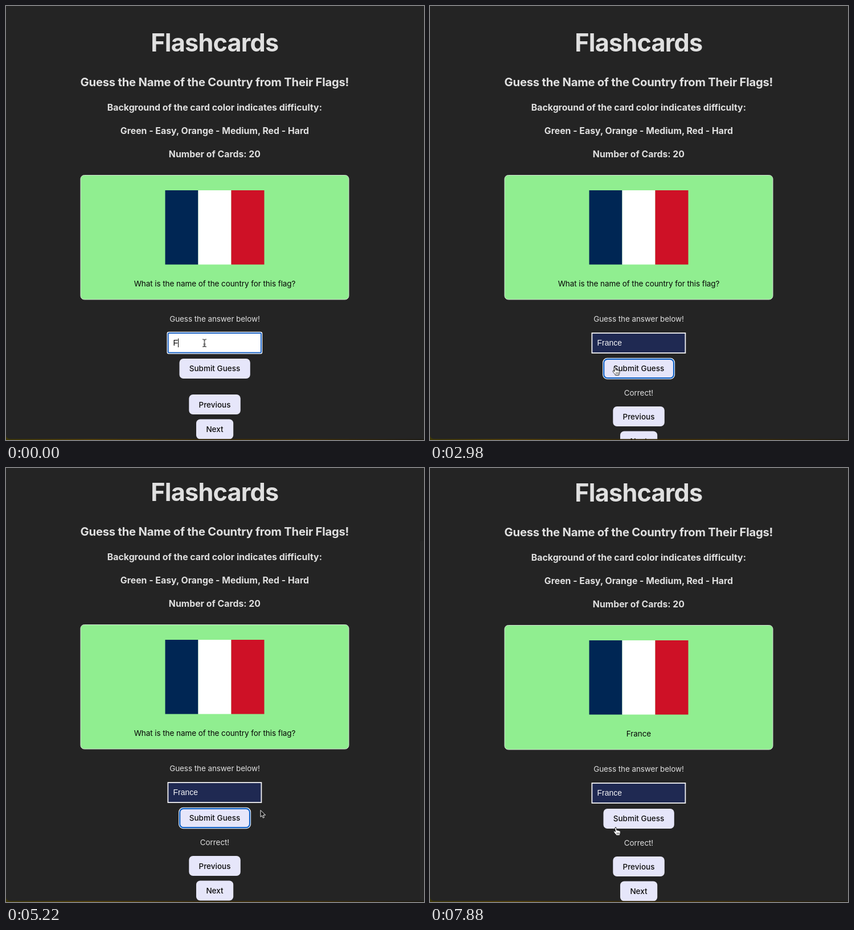
An HTML page that plays this animation: 734x763 px, repeating every 8 s.

```html
<!DOCTYPE html>
<html lang="en">
<head>
<meta charset="utf-8">
<title>Flashcards</title>
<style>
html, body { margin: 0; width: 100%; height: 100%; overflow: hidden; background: #242424; }
svg { display: block; width: 734px; height: 763px; }
text {
  font: 400 13.5px Inter, "Open Sans", sans-serif;
  font-optical-sizing: none;
  letter-spacing: -.08px;
  fill: #e0e0e0;
}
.mid { text-anchor: middle; }
.title { font-size: 43.2px; font-weight: 700; letter-spacing: -.8px; }
.sub { font-size: 20.25px; font-weight: 700; letter-spacing: -.24px; }
.note { font-size: 15.8px; font-weight: 700; letter-spacing: .01px; }
.field { font: 400 13.92px "Liberation Sans", Arial, sans-serif; letter-spacing: 0; }
.dark text, text.dark { fill: #050505; }
.button rect { fill: #e6e6fa; }
.button text { font-weight: 500; letter-spacing: 0; fill: #0c0c0c; }

/* Every change is a hard step in one 8 s loop. */
.a { animation: 8s step-end infinite; }
#page { animation-name: scroll; }
#nav { animation-name: push; }
#bar { animation-name: bar; }
#typing { animation-name: typing; }
#entered { animation-name: entered; }
#caret { animation-name: caret; }
#ring { animation-name: ring; }
#correct { animation-name: correct; }
#question { animation-name: question; }
#answer { animation-name: answer; }
#cursor { animation-name: travel; }
#beam { animation-name: beam; }
#arrow { animation-name: arrow; }
#hand { animation-name: hand; }
.k1 { animation-name: k1; }
.k2 { animation-name: k2; }
.k3 { animation-name: k3; }
.k4 { animation-name: k4; }
.k5 { animation-name: k5; }

@keyframes scroll {
  0% { transform: translateY(0); }
  55.8% { transform: translateY(-13px); }
  57.7% { transform: translateY(-24px); }
  59.6% { transform: translateY(-22px); }
  67.1%, 100% { transform: translateY(-21px); }
}
@keyframes push {
  0% { transform: translateY(0); }
  35.3%, 100% { transform: translateY(21px); }
}
@keyframes bar {
  0% { opacity: 0; }
  55.8% { opacity: 1; }
  65.2% { opacity: .04; }
  67.1%, 100% { opacity: 0; }
}
@keyframes typing { 0% { opacity: 1; } 33.4%, 100% { opacity: 0; } }
@keyframes entered { 0% { opacity: 0; } 33.4%, 100% { opacity: 1; } }
@keyframes ring { 0% { opacity: 0; } 33.4% { opacity: 1; } 76.3%, 100% { opacity: 0; } }
@keyframes correct { 0% { opacity: 0; } 35.3%, 100% { opacity: 1; } }
@keyframes question { 0% { opacity: 1; } 76.3%, 100% { opacity: 0; } }
@keyframes answer { 0% { opacity: 0; } 76.3%, 100% { opacity: 1; } }
@keyframes k1 { 0% { fill-opacity: 0; } 1.8%, 100% { fill-opacity: 1; } }
@keyframes k2 { 0% { fill-opacity: 0; } 5.6%, 100% { fill-opacity: 1; } }
@keyframes k3 { 0% { fill-opacity: 0; } 9.2%, 100% { fill-opacity: 1; } }
@keyframes k4 { 0% { fill-opacity: 0; } 20.3%, 100% { fill-opacity: 1; } }
@keyframes k5 { 0% { fill-opacity: 0; } 22.2%, 100% { fill-opacity: 1; } }
@keyframes caret {
  0% { transform: translateX(302px); opacity: 1; }
  1.8% { transform: translateX(306.5px); opacity: 1; }
  5.6% { transform: translateX(314.5px); opacity: 1; }
  9.2% { transform: translateX(322.5px); opacity: 1; }
  20.3% { transform: translateX(329.5px); opacity: 1; }
  22.2% { transform: translateX(337px); opacity: 1; }
  27.8%, 100% { transform: translateX(337px); opacity: 0; }
}
@keyframes travel {
  0% { transform: translate(348.5px, 592.5px); }
  27.8% { transform: translate(310px, 606px); }
  29.7% { transform: translate(267px, 636px); }
  31.6% { transform: translate(324.5px, 635px); }
  46.6% { transform: translate(335px, 634px); }
  48.4% { transform: translate(368px, 628px); }
  50.3% { transform: translate(405px, 621px); }
  52.1% { transform: translate(436px, 612px); }
  53.9% { transform: translate(448px, 605px); }
  55.8% { transform: translate(447px, 602px); }
  67.1% { transform: translate(448px, 560px); }
  68.9% { transform: translate(450px, 500px); }
  70.7% { transform: translate(451px, 450px); }
  72.6% { transform: translate(450px, 432px); }
  81.9% { transform: translate(450px, 436px); }
  83.8% { transform: translate(456px, 448px); }
  85.7% { transform: translate(472px, 490px); }
  87.6% { transform: translate(491px, 545px); }
  89.3% { transform: translate(505px, 595px); }
  91.2% { transform: translate(507px, 622px); }
  93.1% { transform: translate(507px, 638px); }
  94.8% { transform: translate(507px, 645px); }
  96.6% { transform: translate(507px, 661px); }
  98.4%, 100% { transform: translate(326px, 632px); }
}
@keyframes beam {
  0% { opacity: 1; }
  29.7% { opacity: 0; }
  53.9% { opacity: 1; }
  55.8%, 100% { opacity: 0; }
}
@keyframes arrow {
  0% { opacity: 0; }
  29.7% { opacity: 1; }
  31.6% { opacity: 0; }
  52.1% { opacity: 1; }
  53.9% { opacity: 0; }
  55.8% { opacity: 1; }
  70.7% { opacity: 0; }
  87.6% { opacity: 1; }
  98.4%, 100% { opacity: 0; }
}
@keyframes hand {
  0% { opacity: 0; }
  31.6% { opacity: 1; }
  52.1% { opacity: 0; }
  70.7% { opacity: 1; }
  87.6% { opacity: 0; }
  98.4%, 100% { opacity: 1; }
}
</style>
</head>
<body>
<svg viewBox="0 0 734 763" xmlns="http://www.w3.org/2000/svg">
  <defs>
    <linearGradient id="desk">
      <stop offset="0" stop-color="#3c3608"/>
      <stop offset=".2" stop-color="#574206"/>
      <stop offset=".45" stop-color="#3a2c0a"/>
      <stop offset=".7" stop-color="#443208"/>
      <stop offset="1" stop-color="#1d1a12"/>
    </linearGradient>
    <clipPath id="window"><path d="M0 0H734V761.2H8Q0 761.2 0 754Z"/></clipPath>
    <path id="stem" d="M-3 -6.5Q0 -6.5 0 -4.5V4.5Q0 6.5 -3 6.5M3 -6.5Q0 -6.5 0 -4.5M0 4.5Q0 6.5 3 6.5M-1.5 2H1.5"/>
  </defs>
  <rect y="750" width="734" height="13" fill="url(#desk)"/>

  <g clip-path="url(#window)">
    <rect width="734" height="763" fill="#242424"/>
    <g id="page" class="a">
      <text class="mid title" x="366.3" y="79.5">Flashcards</text>
      <text class="mid sub" x="366.4" y="141.2">Guess the Name of the Country from Their Flags!</text>
      <text class="mid note" x="366.4" y="184.4">Background of the card color indicates difficulty:</text>
      <text class="mid note" x="366.4" y="225.3">Green - Easy, Orange - Medium, Red - Hard</text>
      <text class="mid note" x="366.4" y="266.2">Number of Cards: 20</text>

      <rect x="131" y="297.5" width="471" height="218.5" rx="6.5" fill="#90ee90" stroke="#d3e3d3"/>
      <rect x="279.5" y="324" width="58" height="130.5" fill="#002654"/>
      <rect x="337.5" y="324" width="58" height="130.5" fill="#fff"/>
      <rect x="395.5" y="324" width="58" height="130.5" fill="#ce1126"/>
      <g class="dark">
        <text id="question" class="a mid" x="366.5" y="493">What is the name of the country for this flag?</text>
        <text id="answer" class="a mid" x="366.5" y="493">France</text>
      </g>

      <text class="mid" x="366.5" y="555">Guess the answer below!</text>
      <g id="typing" class="a">
        <rect x="282.5" y="572.8" width="167.7" height="39" rx="3" fill="#fff"/>
        <rect x="284.7" y="575" width="163.3" height="34.6" rx="1.5" fill="#fff" stroke="#1a62c4" stroke-width="2"/>
        <text class="field dark" x="293.6" y="597.2">F<tspan class="a k1">r</tspan><tspan class="a k2">a</tspan><tspan class="a k3">n</tspan><tspan class="a k4">c</tspan><tspan class="a k5">e</tspan></text>
        <rect id="caret" class="a" y="584.5" width="1" height="15.5" fill="#000"/>
      </g>
      <g id="entered" class="a">
        <rect x="284.4" y="575" width="164" height="35" fill="#1f2952" stroke="#f4f4f6" stroke-width="1.8"/>
        <text class="field" x="293.6" y="597.2" style="fill:#f6f6f8">France</text>
      </g>

      <g class="button">
        <rect x="304.5" y="620" width="124.3" height="35" rx="7"/>
        <g id="ring" class="a">
          <rect x="303.1" y="618.8" width="127" height="37.4" rx="8" style="fill:#fff"/>
          <rect x="305.2" y="620.9" width="122.8" height="33.2" rx="6.4" stroke="#1060c4" stroke-width="2.2"/>
        </g>
        <text class="mid" x="366.5" y="642.4">Submit Guess</text>
      </g>
      <text id="correct" class="a mid" x="366.5" y="684.8">Correct!</text>
      <g id="nav" class="a button">
        <rect x="321.3" y="683" width="90.5" height="35" rx="7"/>
        <text class="mid" x="366.5" y="705.5">Previous</text>
        <rect x="334" y="726.5" width="65.2" height="35" rx="7"/>
        <text class="mid" x="366.5" y="749">Next</text>
      </g>
    </g>
    <rect id="bar" class="a" x="727" y="127.5" width="6.2" height="632" rx="3.1" fill="#979797"/>
  </g>

  <g id="cursor" class="a" stroke-linejoin="round" stroke-linecap="round">
    <g id="beam" class="a" fill="none">
      <use href="#stem" stroke="#fff" stroke-width="2.4"/>
      <use href="#stem" stroke="#111" stroke-width="1.1"/>
    </g>
    <path id="arrow" class="a" d="M0 0V11.4L2.6 9L4.4 13.2L6.4 12.3L4.6 8.2H8.2Z" fill="#111" stroke="#f2f2f2"/>
    <g id="hand" class="a">
      <g transform="translate(-4.2 -1)" stroke="#111">
        <path d="M4.2 1C5.4 1 5.6 2 5.7 3L6.2 6.2C7 5.6 8 5.8 8.4 6.5C9.3 6 10.2 6.3 10.5 7.1C11.6 6.7 12.5 7.3 12.5 8.4L12.4 11C12.3 12.4 11.4 13 11.4 15H5.2C5 13.3 3 12 1.9 10.3C1.2 9.2 .4 8.3 .9 7.6C1.6 6.9 2.8 7.6 3.7 8.6L2.9 3C2.7 1.7 3.2 1 4.2 1Z" fill="#fff"/>
        <path d="M6.4 10.2V12.6M8.3 10.2V12.6M10.2 10.2V12.6" stroke-width=".7"/>
      </g>
    </g>
  </g>
</svg>
</body>
</html>
```
